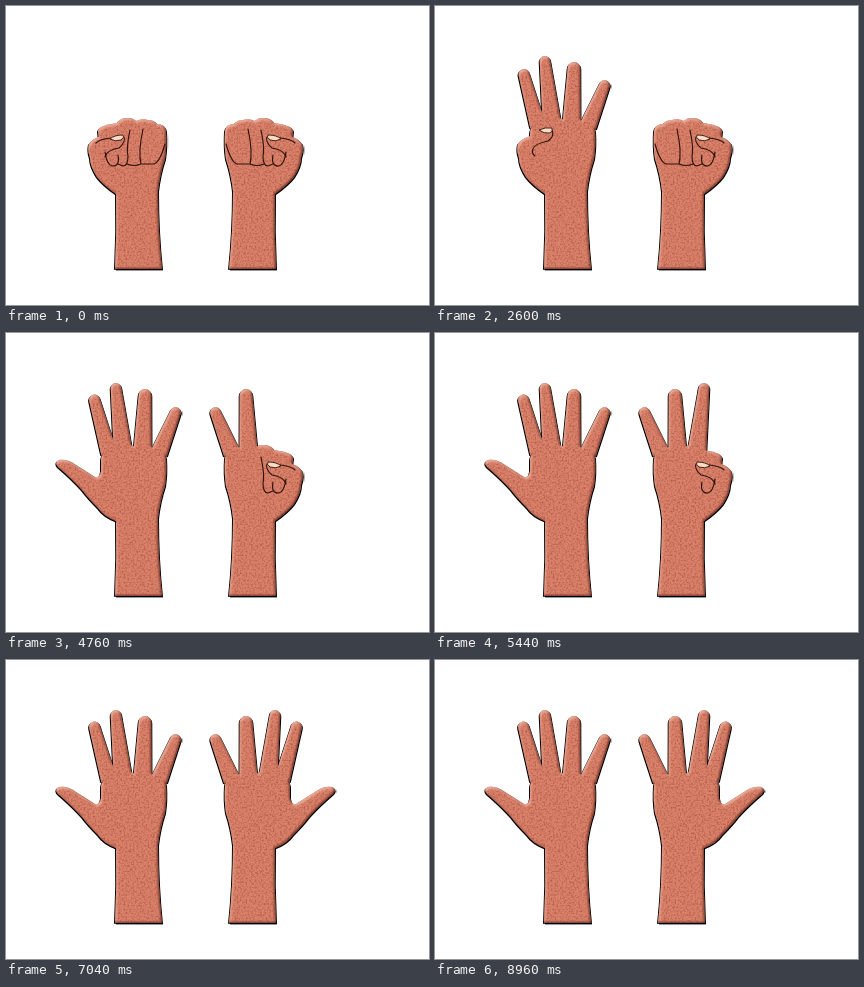
An HTML page that plays this animation: 423 by 299 pixels, repeating every 9000 ms.

```html
<!DOCTYPE html>
<html lang="en">
<head>
<meta charset="utf-8">
<title>Counting to ten on two hands</title>
<style>
  html, body { margin: 0; width: 100%; height: 100%; overflow: hidden; background: #fff; }
  svg { display: block; width: 423px; height: 299px; }
  .skin { fill: #da826b; }
  .line { fill: none; stroke: #30130d; stroke-width: 1.15; stroke-linecap: round; stroke-linejoin: round; }
  .crease { fill: none; stroke: #9d4e3d; stroke-width: 0.8; opacity: 0.45; }
  .nail { fill: #f8dcc5; stroke: #30130d; stroke-width: 0.9; }
</style>
</head>
<body>
<svg viewBox="0 0 423 299">
  <defs>
    <filter id="bevel" filterUnits="userSpaceOnUse" x="0" y="0" width="423" height="299" color-interpolation-filters="sRGB">
      <feOffset in="SourceAlpha" dx="1.4" dy="1.4" result="shadeR"/>
      <feOffset in="SourceAlpha" dx="-0.8" dy="0.8" result="shadeL"/>
      <feGaussianBlur in="SourceAlpha" stdDeviation="1.3" result="soft"/>
      <feOffset in="soft" dx="-1.5" dy="-1.5" result="up"/>
      <feFlood flood-color="#5a2118" flood-opacity="0.85"/>
      <feComposite in2="SourceAlpha" operator="in"/>
      <feComposite in2="up" operator="out" result="dark"/>
      <feOffset in="soft" dx="1.4" dy="1.6" result="down"/>
      <feFlood flood-color="#f6bfae" flood-opacity="0.8"/>
      <feComposite in2="SourceAlpha" operator="in"/>
      <feComposite in2="down" operator="out" result="light"/>
      <feTurbulence type="fractalNoise" baseFrequency="0.55" numOctaves="2" seed="4"/>
      <feColorMatrix values="0 0 0 0 0.62  0 0 0 0 0.28  0 0 0 0 0.2  1.6 0 0 0 -0.68"/>
      <feComposite in2="SourceAlpha" operator="in" result="grain"/>
      <feMerge>
        <feMergeNode in="shadeL"/>
        <feMergeNode in="shadeR"/>
        <feMergeNode in="SourceGraphic"/>
        <feMergeNode in="grain"/>
        <feMergeNode in="light"/>
        <feMergeNode in="dark"/>
      </feMerge>
    </filter>
  </defs>
</svg>
<script>
const LOOP = 9000, FIRST = 610, GAP = 615, RISE = 150;
const svg = document.querySelector('svg');

const PALM = 'M109 263 Q111 225 110 187 Q97 178 95 165 L95 128 Q95 121 100 119 L111 117 ' +
  'Q114 112 122 112 Q127 112 130 115 Q136 112 142 114 Q148 114 151 118 Q159 118 160 125 ' +
  'Q161 140 159 153 Q154 168 152 185 Q152 225 156 263 Z';
const FIST_THUMB = 'M110 188 Q97 179 91 171 Q84 160 84 152 Q81 144 83 138 Q87 132 96 130 L116 130 L116 180 Z';
const OPEN_THUMB = 'M112 189 Q98 184 92 175 Q82 165 76 157 Q66 146 52 134 Q48 129 53 127 ' +
  'Q62 126 70 132 L89 144 Q94 145 95 138 L116 138 L116 180 Z';
const KNUCKLE = 'M93 134 L92 125 Q93 121 98 120 L112 117 L116 134 Z';
const CREASES = 'M111 162 l3 4 M114 166 l4 1 M126 167 l4 -1 M130 165 v-3';

// Pinky to index: base point, tip centre, half widths, line drawn while folded
const FINGERS = [
  { base: [153, 120], tip: [169.5, 79.5], wide: 8.5, thin: 5.3, fold: 'M159 138 Q154 156 148 158 L136 158' },
  { base: [136.5, 118], tip: [139, 62], wide: 9, thin: 6.3, fold: 'M137 123 Q132 146 135 158 Q128 161 121 158' },
  { base: [117, 118], tip: [110, 55.5], wide: 9.3, thin: 5.3, fold: 'M124 124 Q120 143 122 150 Q122 160 117 160 L112 158' },
  { base: [103, 120], tip: [88.5, 67], wide: 8, thin: 5.4, fold: 'M99 146 Q101 160 107 160 Q114 160 112 149' }
];

function add(parent, tag, attrs) {
  const el = document.createElementNS('http://www.w3.org/2000/svg', tag);
  for (const key in attrs) el.setAttribute(key, attrs[key]);
  return parent.appendChild(el);
}

const show = (el, on) => el.setAttribute('visibility', on ? 'visible' : 'hidden');
const clamp = v => Math.min(1, Math.max(0, v));

function fingerPath({ base: [bx, by], tip: [tx, ty], wide, thin }, grow) {
  const len = Math.hypot(tx - bx, ty - by);
  const nx = -(ty - by) / len, ny = (tx - bx) / len;
  const x = bx + (tx - bx) * grow, y = by + (ty - by) * grow;
  const side = (px, py, w) => `${(px + nx * w).toFixed(2)} ${(py + ny * w).toFixed(2)}`;
  return `M${side(bx, by, -wide)} L${side(x, y, -thin)} A${thin} ${thin} 0 0 1 ${side(x, y, thin)} L${side(bx, by, wide)} Z`;
}

function makeHand(mirrored) {
  const flip = mirrored ? { transform: 'translate(379 0) scale(-1 1)' } : {};
  const body = add(add(svg, 'g', { filter: 'url(#bevel)' }), 'g', flip);
  const marks = add(svg, 'g', flip);
  const skin = d => add(body, 'path', { class: 'skin', d });
  const line = (parent, d) => add(parent, 'path', { class: 'line', d });

  const fingers = FINGERS.map(() => skin(''));
  const knuckle = skin(KNUCKLE);
  const openThumb = skin(OPEN_THUMB);
  const fistThumb = skin(FIST_THUMB);
  skin(PALM);

  add(marks, 'path', { class: 'crease', d: CREASES });
  const folds = FINGERS.map(f => line(marks, f.fold));
  const thumb = add(marks, 'g', {});
  line(thumb, 'M90 137 Q94 133 105 132 M118 131 Q120 136 113 142 Q101 144 99 151');
  add(thumb, 'path', { class: 'nail', d: 'M104 133 Q108 129 117 129 Q119 131 115 134 Q109 136 104 133 Z' });
  const raisedThumb = add(marks, 'g', {});
  line(raisedThumb, 'M117 124 Q120 130 113 135 Q99 138 98 143 Q96 147 100 150');
  add(raisedThumb, 'path', { class: 'nail', d: 'M104 124 Q110 121 117 122 Q118 125 115 127 Q109 128 104 124 Z' });

  let last = '';
  return grow => {
    const key = grow.join();
    if (key === last) return;
    last = key;
    FINGERS.forEach((f, i) => {
      fingers[i].setAttribute('d', fingerPath(f, grow[i]));
      show(fingers[i], grow[i] > 0);
      show(folds[i], grow[i] === 0);
    });
    const indexUp = grow[3] > 0, thumbOut = grow[4];
    show(knuckle, !indexUp);
    show(thumb, !indexUp);
    show(raisedThumb, indexUp && thumbOut === 0);
    show(fistThumb, thumbOut < 0.4);
    show(openThumb, thumbOut > 0);
    const s = 0.6 + 0.4 * thumbOut;
    openThumb.setAttribute('transform', `translate(112 180) scale(${s}) translate(-112 -180)`);
  };
}

const hands = [makeHand(false), makeHand(true)];

function draw(now) {
  const t = now % LOOP;
  hands.forEach((pose, h) => {
    pose([0, 1, 2, 3, 4].map(i => clamp((t - FIRST - GAP * (h * 5 + i)) / RISE)));
  });
}

const start = performance.now();
function tick() {
  draw(performance.now() - start);
  requestAnimationFrame(tick);
}
tick();
</script>
</body>
</html>
```
